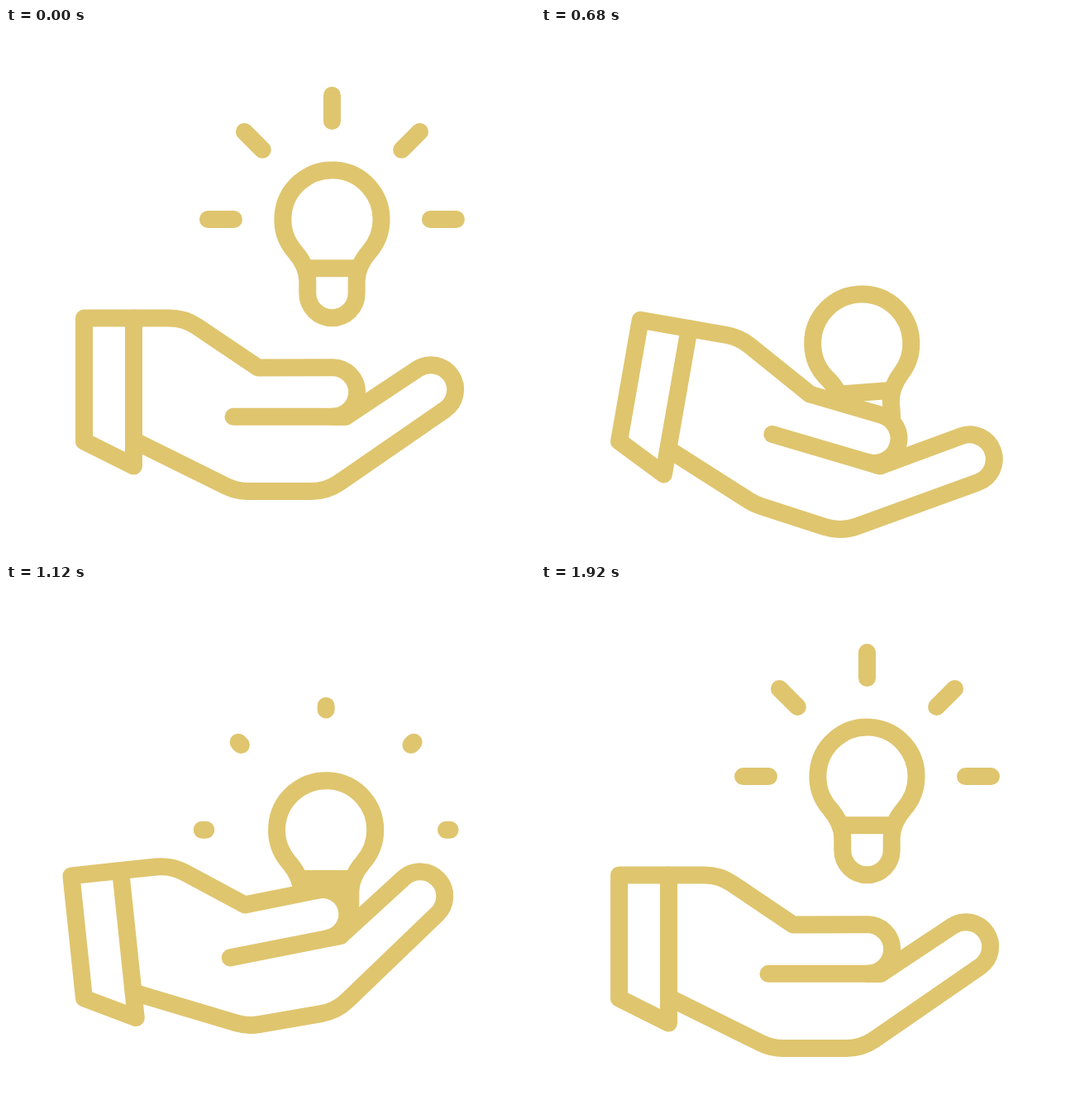
Write an HTML page with a canvas that moves like this. It is 640 px wide and 640 px high and loops after 2 s.

```html
<!DOCTYPE html>
<html lang="en">
<head>
<meta charset="utf-8">
<title>Idea in hand</title>
<style>
html, body { margin: 0; width: 100%; height: 100%; overflow: hidden; background: #fff; }
canvas { display: block; width: 640px; height: 640px; }
</style>
</head>
<body>
<canvas id="stage" width="640" height="640"></canvas>
<script>
const ctx = document.getElementById('stage').getContext('2d');
const LOOP = 2000, STEP = 40, GOLD = '#dfc56e', LINE = 21;
const RAD = Math.PI / 180;
const DOWN = 10, UP = 10.7;      // wrist swing in degrees
const TIP = 29.7;                // radius of the finger ends and bulb base
const ROUND = 60;                // radius of the soft corners

// eased 0..1 between two times
function ease(t, from, to) {
  const u = Math.min(1, Math.max(0, (t - from) / (to - from)));
  return u * u * (3 - 2 * u);
}

// turn a point about a centre
function turn([x, y], [cx, cy], deg) {
  const c = Math.cos(deg * RAD), s = Math.sin(deg * RAD);
  const dx = x - cx, dy = y - cy;
  return [cx + dx * c - dy * s, cy + dx * s + dy * c];
}

// angle on a finger-end circle where the tangent through p touches it
function touch(p, c, side) {
  const dx = p[0] - c[0], dy = p[1] - c[1];
  return Math.atan2(dy, dx) + side * Math.acos(TIP / Math.hypot(dx, dy));
}

// down and up are 0..1; the palm bends about its middle, further than the wrist
function drawHand(down, up, deg) {
  const bend = 6.5 * down - 9.3 * up;
  const lift = 16.5 * up;
  const flex = (x, y, share = 1, rise = lift) => {
    const p = turn([x, y], [370, 470], bend * share);
    return [p[0], p[1] - rise];
  };
  const root = flex(305, 411);
  const finger = flex(395, 440.5);
  const crease = flex(275, 470.3);
  const fork = flex(411, 470.3);
  const thumb = flex(514, 437.5, 0.65);
  const heelR = flex(388, 560.5, 1, lift * 1.2);
  const heelL = flex(279, 560.5, 1, lift * 1.5 + 3 * down);

  ctx.save();
  ctx.translate(94.5, 500);
  ctx.rotate(deg * RAD);
  ctx.translate(-94.5, -500);

  ctx.beginPath();
  ctx.moveTo(154.5, 351);
  ctx.arcTo(216, 351, ...root, ROUND);
  ctx.lineTo(...root);
  ctx.arc(...finger, TIP, touch(root, finger, 1), touch(crease, finger, -1));
  ctx.lineTo(...fork);
  ctx.arc(...thumb, TIP, touch(fork, thumb, 1), touch(heelR, thumb, -1));
  ctx.arcTo(...heelR, ...heelL, ROUND);
  ctx.arcTo(...heelL, 154.5, 499, ROUND);
  ctx.lineTo(154.5, 499);
  ctx.fill();
  ctx.stroke();

  ctx.beginPath();
  ctx.moveTo(...crease);
  ctx.lineTo(...fork);
  ctx.stroke();

  // cuff
  ctx.beginPath();
  ctx.moveTo(94.5, 351);
  ctx.lineTo(154.5, 351);
  ctx.lineTo(154.5, 530);
  ctx.lineTo(94.5, 500);
  ctx.closePath();
  ctx.fill();
  ctx.stroke();
  ctx.restore();
}

// drawn around the centre of the glass
function drawBulb(x, y, tilt, ray) {
  ctx.save();
  ctx.translate(x, y);
  ctx.rotate(tilt * RAD);

  ctx.beginPath();
  ctx.arc(0, 0, 59.6, 138.7 * RAD, 401.3 * RAD);
  ctx.quadraticCurveTo(TIP, 57, TIP, 75);
  ctx.arc(0, 89.5, TIP, 0, Math.PI);
  ctx.lineTo(-TIP, 75);
  ctx.quadraticCurveTo(-TIP, 57, -44.8, 39.3);
  ctx.moveTo(-TIP, 59.2);
  ctx.lineTo(TIP, 59.2);
  ctx.stroke();

  if (ray > 0) {
    const far = 150, near = far - Math.max(0.1, 31 * ray);
    ctx.beginPath();
    for (let i = 0; i < 5; i++) {
      const c = -Math.cos(i * Math.PI / 4), s = -Math.sin(i * Math.PI / 4);
      ctx.moveTo(c * far, s * far);
      ctx.lineTo(c * near, s * near);
    }
    ctx.stroke();
  }
  ctx.restore();
}

function draw(t) {
  const toss = ease(t, 700, 980);
  const down = ease(t, 280, 700) * (1 - toss);
  const up = toss * (1 - ease(t, 980, 1285));
  const deg = DOWN * down - UP * up;

  // the bulb falls, rides on the palm, then floats back up
  const fall = ease(t, 0, 330) - ease(t, 1360, 1930);
  const x = 394.5 - 11 * (ease(t, 300, 1000) - ease(t, 1000, 1310));
  const y = 231.5 + 97 * fall + 308 * Math.sin(deg * RAD);
  const tilt = -4.3 * (ease(t, 250, 700) - ease(t, 820, 1020));
  const ray = 1 - ease(t, 0, 670) + ease(t, 867, 1905);

  ctx.fillStyle = '#fff';
  ctx.fillRect(0, 0, 640, 640);
  ctx.strokeStyle = GOLD;
  ctx.lineWidth = LINE;
  ctx.lineCap = ctx.lineJoin = 'round';
  drawBulb(x, y, tilt, ray);
  drawHand(down, up, deg);
}

const start = performance.now();
function tick() {
  const t = (performance.now() - start) % LOOP;
  draw(Math.floor(t / STEP) * STEP);
  requestAnimationFrame(tick);
}
tick();
</script>
</body>
</html>
```
